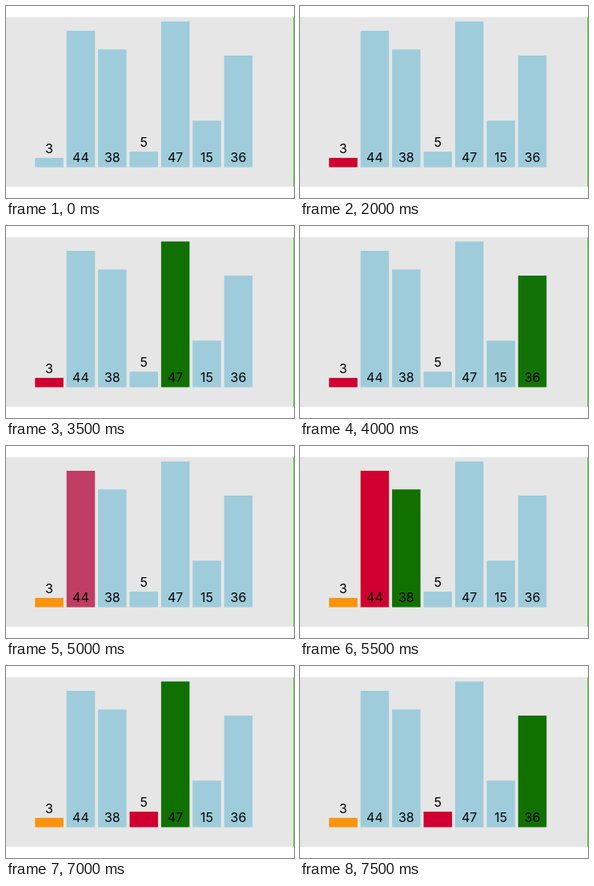
Write an HTML page with a canvas that moves like this. It is 360 px wide and 240 px high and loops after 8000 ms.

```html
<!DOCTYPE html>
<html>
<head>
<meta charset="utf-8">
<style>
  html, body { margin: 0; height: 100%; overflow: hidden; background: #fff; }
  canvas { display: block; }
</style>
</head>
<body>
<canvas id="stage" width="360" height="240"></canvas>
<script>
const ctx = document.getElementById('stage').getContext('2d');
const LOOP = 8000, START = 1765, STEP = 348, FADE = 180;
const BASE = 201.5, UNIT = 3.875, PITCH = 39.4, BAR = 35.5;
const values = [3, 44, 38, 5, 47, 15, 36];
const colors = {
  b: [158, 204, 219],
  r: [207, 0, 47],
  g: [16, 112, 0],
  o: [250, 147, 13]
};

// Selection sort: one letter per bar (blue, red minimum, green compared, orange sorted)
const states = [
  'bbbbbbb',
  'rbbbbbb', 'rgbbbbb', 'rbgbbbb', 'rbbgbbb', 'rbbbgbb', 'rbbbbgb', 'rbbbbbg',
  'rbbbbbb', 'obbbbbb',
  'orbbbbb', 'orgbbbb', 'obrbbbb', 'obrgbbb', 'obbrbbb', 'obbrgbb', 'obbrbgb', 'obbrbbg'
];

const ease = t => t < 0.5 ? 4 * t ** 3 : 1 - 4 * (1 - t) ** 3;

function barColor(i, time) {
  const step = Math.min(states.length - 1, Math.max(0, Math.floor((time - START) / STEP) + 1));
  const to = colors[states[step][i]];
  if (step === 0) return `rgb(${to})`;
  const from = colors[states[step - 1][i]];
  const k = ease(Math.min(1, (time - START - (step - 1) * STEP) / FADE));
  return `rgb(${from.map((c, n) => Math.round(c + (to[n] - c) * k))})`;
}

function draw(time) {
  ctx.fillStyle = '#fff';
  ctx.fillRect(0, 0, 360, 240);
  ctx.fillStyle = '#e6e6e6';
  ctx.fillRect(0, 14, 359, 212);
  ctx.fillStyle = '#5be03c';
  ctx.fillRect(359, 14, 1, 212);

  ctx.font = '16px Inter, sans-serif';
  ctx.textAlign = 'center';
  values.forEach((value, i) => {
    const x = 36.3 + i * PITCH, height = value * UNIT;
    ctx.fillStyle = barColor(i, time);
    ctx.fillRect(x, BASE - height, BAR, height);
    ctx.fillStyle = '#000';
    ctx.fillText(value, x + BAR / 2, value < 10 ? BASE - height - 6 : 195.3);
  });
}

function frame() {
  draw(performance.now() % LOOP);
  requestAnimationFrame(frame);
}
frame();
</script>
</body>
</html>
```
